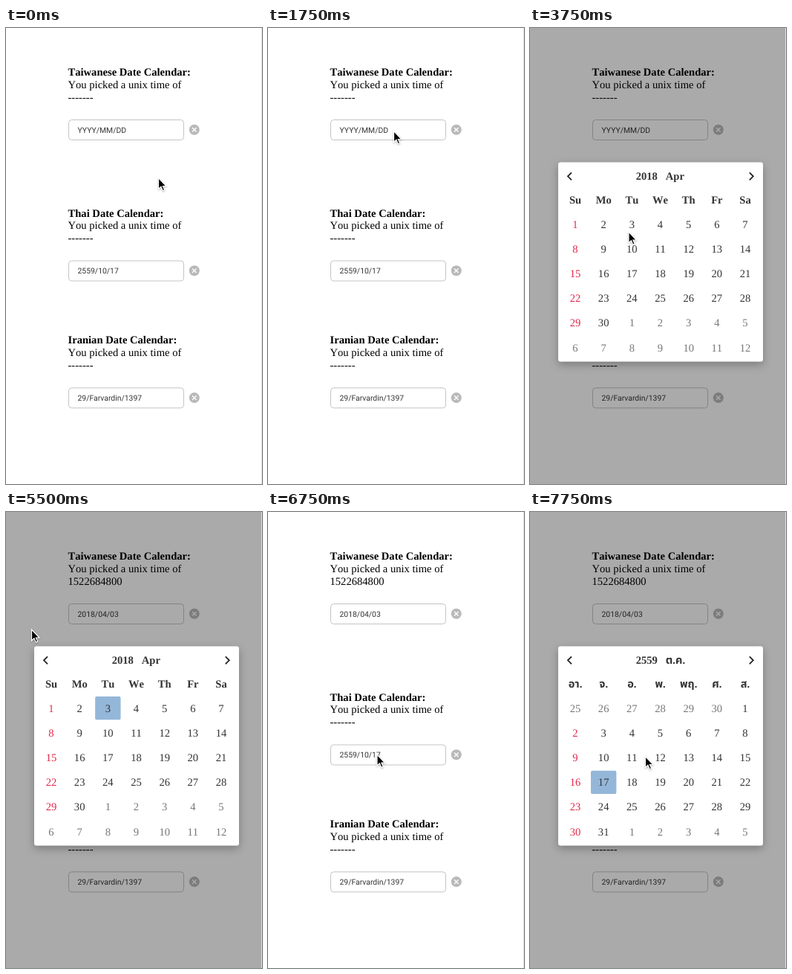
Animation of 345x613 px, one loop 8000 ms. Source, as an HTML page:

```html
<!DOCTYPE html>
<html lang="en">
<head>
<meta charset="utf-8">
<title>Date calendars</title>
<style>
  html, body { margin: 0; width: 100%; height: 100%; overflow: hidden; background: #fff; }
  svg { display: block; width: 100%; height: 100%; text-rendering: geometricPrecision; }
  text { font: 14.6px "Liberation Serif", "Noto Sans Thai", "Noto Sans", serif; font-kerning: none; }
  .bold { font-weight: bold; }
  .value { font: 10.4px Roboto, "Noto Sans", sans-serif; fill: #333; }
  .field { fill: #fff; stroke: #c4c4c4; }
  .mid { text-anchor: middle; }
  .panel text { fill: #333; }
  .panel .sunday { fill: #e3274a; }
  .panel .other { fill: #777; }
  .panel { filter: drop-shadow(0 4px 6px rgba(0, 0, 0, .28)); }
  .chevron { fill: none; stroke: #222; stroke-width: 1.8; }
  #cursor { stroke: #fff; stroke-width: 1.2; filter: drop-shadow(0 1px 1px rgba(0, 0, 0, .3)); }
</style>
</head>
<body>
<svg viewBox="0 0 345 613" preserveAspectRatio="none">
  <g id="page"></g>
  <rect id="shade" width="344" height="613" opacity=".335"/>
  <g id="panels"></g>
  <rect x="344" width="1" height="613" fill="#e2e2e2"/>
  <path id="cursor" d="M0 0V15L3.4 11.8L5.8 17.3L8.2 16.3L5.9 11H10.4Z"/>
</svg>
<script>
const LOOP = 8000;
const TICK = 250;
const $ = id => document.getElementById(id);
const text = (x, y, content, cls = '', id = '') =>
  `<text x="${x}" y="${y}" class="${cls}" id="${id}">${content}</text>`;

function section(name, y, value) {
  const key = name.toLowerCase();
  return `<g transform="translate(0 ${y})">
    ${text(83.5, 64.2, name + ' Date Calendar:', 'bold')}
    ${text(83.5, 80.9, 'You picked a unix time of')}
    ${text(83.5, 97.7, '-------', '', key + '-time')}
    <rect class="field" x="84.5" y="123.5" width="155" height="27" rx="4"/>
    ${text(96.5, 140.7, value, 'value', key + '-value')}
    <circle cx="253.8" cy="136.8" r="7" fill="#b9b9b9"/>
    <path d="M251 134l5.6 5.6m0-5.6l-5.6 5.6" stroke="#fff" stroke-width="1.4"/>
  </g>`;
}

function calendar({ id, year, month, weekdays, lead, previous, length, selected }) {
  const columnX = i => 61 + (i % 7) * 38.17;
  let cells = '';
  for (let i = 0; i < 42; i++) {
    const x = columnX(i), y = 268.5 + Math.floor(i / 7) * 33.2;
    const n = i - lead + 1;
    const other = n < 1 || n > length;
    const day = n < 1 ? n + previous : n > length ? n - length : n;
    if (n === selected) {
      cells += `<rect id="${id}-selected" x="${x - 17.2}" y="${y - 20.4}" width="34.4" height="31.2" rx="2" fill="#94b7d9"/>`;
    }
    cells += text(x, y, day, 'mid ' + (other ? 'other' : i % 7 ? '' : 'sunday'));
  }
  return `<g class="panel" id="${id}">
    <rect x="38" y="180.5" width="276" height="268" rx="3" fill="#fff"/>
    <path class="chevron" d="M56 194.3l-5 5l5 5M295.8 194.3l5 5l-5 5"/>
    ${text(142.7, 204, year, 'bold')}${text(182.8, 204, month, 'bold')}
    ${weekdays.map((d, i) => text(columnX(i), 235.8, d, 'bold mid')).join('')}
    ${cells}
  </g>`;
}

$('page').innerHTML =
  section('Taiwanese', 0, 'YYYY/MM/DD') +
  section('Thai', 189.5, '2559/10/17') +
  section('Iranian', 360.3, '29/Farvardin/1397');

$('panels').innerHTML = calendar({
  id: 'april', year: 2018, month: 'Apr',
  weekdays: ['Su', 'Mo', 'Tu', 'We', 'Th', 'Fr', 'Sa'],
  lead: 0, previous: 31, length: 30, selected: 3
}) + calendar({
  id: 'october', year: 2559, month: 'ต.ค.',
  weekdays: ['อา.', 'จ.', 'อ.', 'พ.', 'พฤ.', 'ศ.', 'ส.'],
  lead: 6, previous: 30, length: 31, selected: 17
});

// Each stroke is a curved sweep bent towards `via`, slowing down as it arrives.
const home = [205.5, 201.5];
const strokes = [
  { start: 0, end: 250, via: home, to: [204.5, 206] },
  { start: 1000, end: 1750, via: [168, 222], to: [169.5, 138.5] },
  { start: 2000, end: 2250, via: [150, 139], to: [143, 139] },
  { start: 2750, end: 3250, via: [145, 64], to: [133, 274] },
  { start: 4750, end: 5500, via: [8, 184], to: [34.5, 158] },
  { start: 6000, end: 7000, via: [87, 313], to: [155.5, 328.5] }
];

function pointerAt(t) {
  let from = home;
  for (const { start, end, via, to } of strokes) {
    const p = Math.min(1, Math.max(0, (t - start) / (end - start)));
    const u = 1 - (1 - p) ** 2;
    from = from.map((a, i) => (1 - u) ** 2 * a + 2 * u * (1 - u) * via[i] + u * u * to[i]);
    if (p < 1) break;
  }
  return from;
}

const show = (id, on) => $(id).style.display = on ? '' : 'none';

function render(t) {
  const picked = t >= 4250;
  const aprilOpen = t >= 2250 && t < 5750;
  const octoberOpen = t >= 7750;
  show('april', aprilOpen);
  show('october', octoberOpen);
  show('shade', aprilOpen || octoberOpen);
  show('april-selected', picked);
  $('taiwanese-time').textContent = picked ? '1522684800' : '-------';
  $('taiwanese-value').textContent = picked ? '2018/04/03' : 'YYYY/MM/DD';
  $('cursor').setAttribute('transform', `translate(${pointerAt(t)})`);
}

const origin = performance.now();
function frame() {
  const t = (performance.now() - origin) % LOOP;
  render(Math.floor(t / TICK) * TICK);
  requestAnimationFrame(frame);
}
frame();
</script>
</body>
</html>
```
